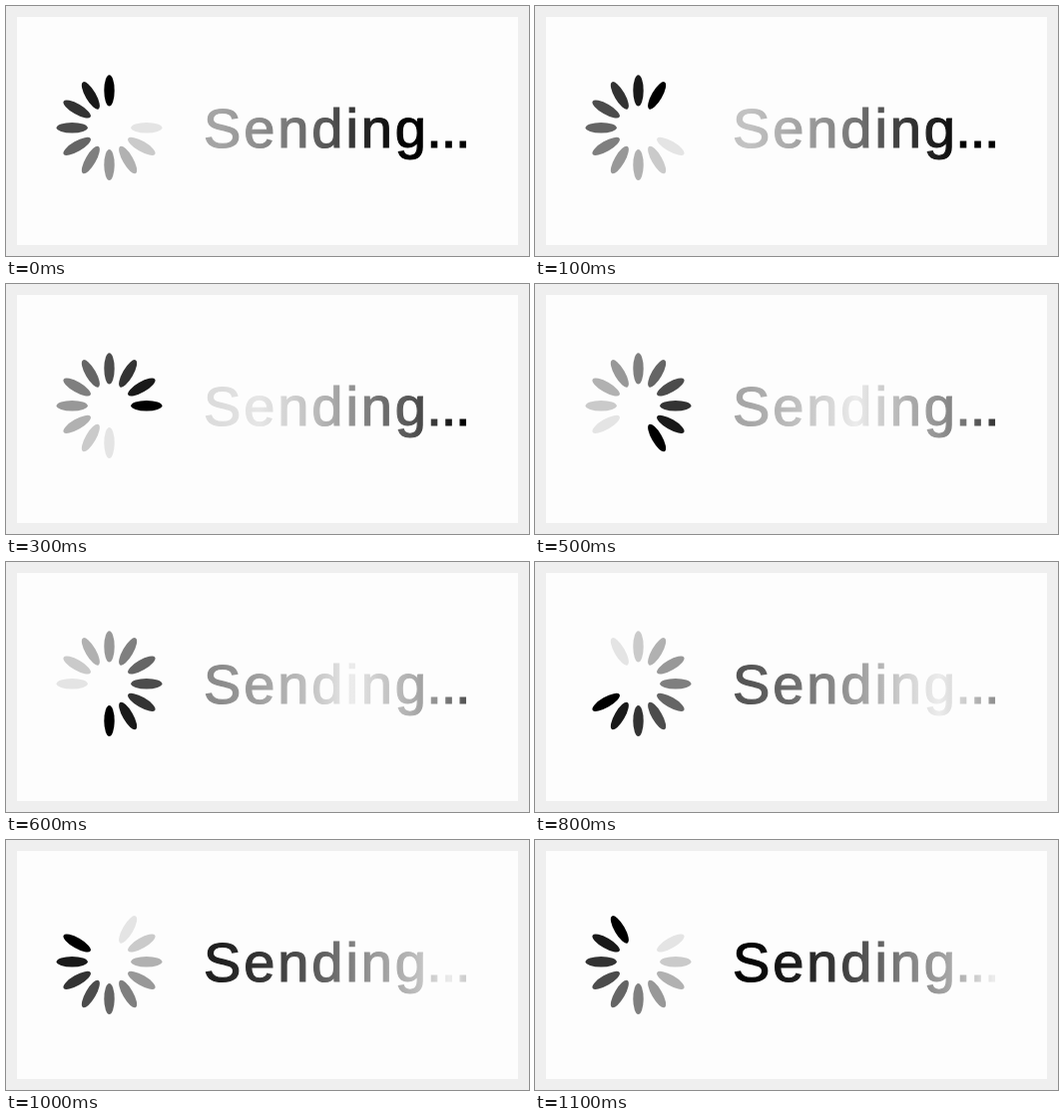
An HTML page for the animation above (1200 ms loop, 524x251 px).

```html
<!DOCTYPE html>
<html lang="en">
<head>
<meta charset="utf-8">
<title>Sending</title>
<style>
  html, body { margin: 0; width: 100%; height: 100%; overflow: hidden; background: #efefef; }
  svg { display: block; filter: blur(0.5px); }
  text { font: 56px "Liberation Sans", Arial, sans-serif; letter-spacing: 2.9px; }
  .dots { letter-spacing: -1.2px; }
</style>
</head>
<body>
<svg width="524" height="251" viewBox="0 0 524 251">
  <defs>
    <linearGradient id="wave" gradientUnits="userSpaceOnUse" x1="200" y1="0" x2="462" y2="0"></linearGradient>
  </defs>
  <rect x="11" y="11" width="502" height="229" fill="#fdfdfd"/>
  <g id="spinner" transform="translate(103.5 122.2)"></g>
  <text x="198" y="141.8" fill="url(#wave)" stroke="url(#wave)" stroke-width="1.2">Sending<tspan class="dots" x="421.3">...</tspan></text>
</svg>
<script>
  const COUNT = 12, STEP = 100;
  const PALEST = 236, RISE = 30, FALL = 27;
  const wave = document.getElementById('wave');
  const spinner = document.getElementById('spinner');

  // Centre of each character and the step at which it is palest.
  const letters = [
    [215, 2.4], [254, 3.2], [289, 4], [322, 5], [347, 6],
    [371, 7], [405, 8], [430, 9], [444, 10], [459, 11]
  ];

  function add(parent, name, attrs) {
    const el = document.createElementNS('http://www.w3.org/2000/svg', name);
    for (const key in attrs) el.setAttribute(key, attrs[key]);
    return parent.appendChild(el);
  }

  function grey(level) {
    const v = Math.max(0, Math.round(level));
    return `rgb(${v},${v},${v})`;
  }

  const petals = Array.from({ length: COUNT }, (_, i) =>
    add(spinner, 'ellipse', { cy: -37.3, rx: 5.2, ry: 15.6, transform: `rotate(${i * 30})` }));

  const stops = letters.map(([x]) => add(wave, 'stop', { offset: (x - 200) / 262 }));

  function draw(step) {
    petals.forEach((petal, i) => {
      const age = (step - i + COUNT) % COUNT;
      petal.setAttribute('fill', age < 10 ? grey(age * 25.3) : 'none');
    });
    stops.forEach((stop, i) => {
      const gap = step - letters[i][1];
      stop.setAttribute('stop-color', grey(PALEST - (gap < 0 ? -gap * RISE : gap * FALL)));
    });
  }

  const start = performance.now();
  function tick() {
    draw(Math.floor((performance.now() - start) / STEP) % COUNT);
    requestAnimationFrame(tick);
  }
  tick();
</script>
</body>
</html>
```
